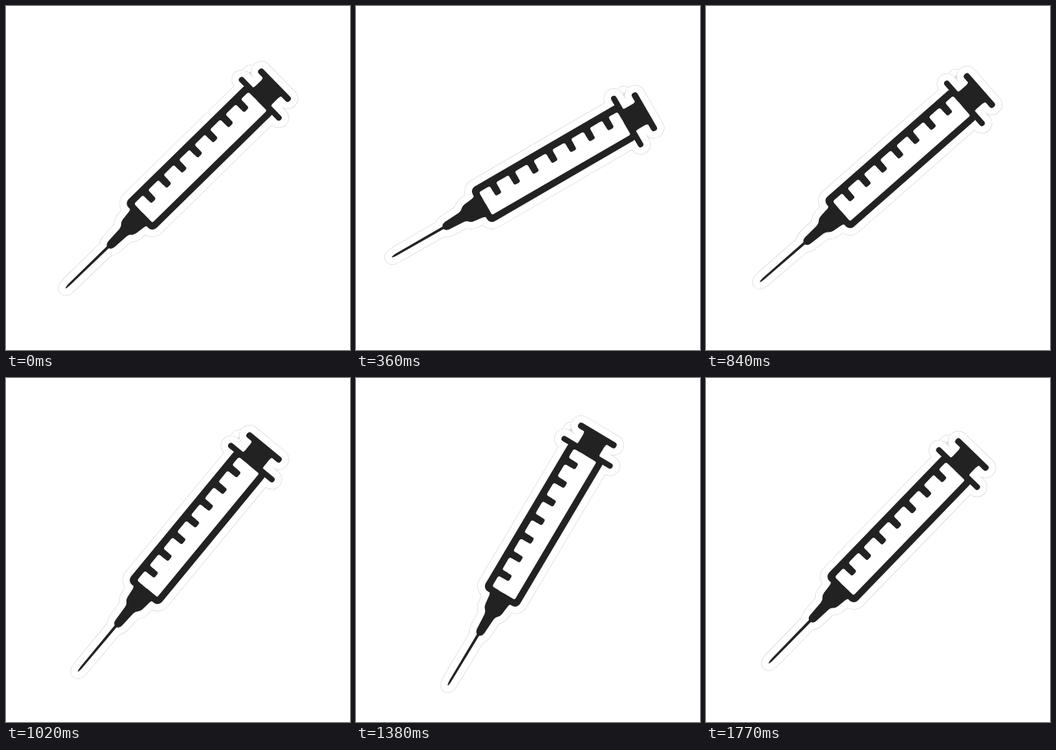
An HTML page that plays this animation: 448x448 px, repeating every 1800 ms.

```html
<!DOCTYPE html>
<html lang="en">
<head>
<meta charset="utf-8">
<title>Swinging syringe</title>
<style>
  html, body { margin: 0; width: 100%; height: 100%; overflow: hidden; background: #fff; }
  svg { display: block; width: 100vw; height: 100vh; }
  #syringe { fill: #222; }
  .border { stroke-linejoin: round; stroke-linecap: round; }
  #edge { stroke: #cfcfcf; stroke-width: 19; }
  #paper { stroke: #fff; fill: #fff; stroke-width: 18; }
  #window { fill: #fff; }
</style>
</head>
<body>
<svg viewBox="0 0 448 448">
  <defs>
    <!-- x runs along the barrel, from needle to plunger -->
    <g id="body">
      <rect x="-73" y="-25.3" width="224" height="52.2" rx="7.5"/>
      <rect x="145" y="-37" width="7.4" height="76.5" rx="3.7"/>
      <path d="M149-18.5Q152-15 155-15H166Q170-15 173-18.5V20.5Q170 17 166 17H155Q152 17 149 20.5Z"/>
      <rect x="170.3" y="-27" width="8.2" height="57" rx="3.7"/>
      <path d="M-70-17Q-74-13-79-13L-89-11.8Q-93-11.2-95-8.8Q-97-6.4-101-6L-122-4.8Q-128.3-4.2-128.5 .8Q-128.3 5.8-122 6.4L-101 7.6Q-97 8-95 10.4Q-93 12.8-89 13.4L-79 14.6Q-74 14.6-70 18.6Z"/>
      <path d="M-126-1.3L-198-1.3Q-205 -.8-205.2 .2Q-205 1.2-198 1.5L-126 2.3Z"/>
    </g>
    <g id="outline">
      <use href="#body"/>
      <circle cx="163" cy="-32" r="1"/>
    </g>
  </defs>
  <g id="syringe">
    <use id="edge" class="border" href="#outline"/>
    <use id="paper" class="border" href="#outline"/>
    <use href="#body"/>
    <g id="window"><rect x="-64.5" y="-7" width="208.5" height="25.2" rx="2"/></g>
    <g id="ticks"></g>
  </g>
</svg>
<script>
  const LOOP = 1800, STEP = 30;
  const REST = 44.4, SWING = 15;
  const TICKS = 7, FIRST = -43.6, GAP = 28.2, THICK = 9;
  const LEFT = -64.5, RIGHT = 144;
  const byId = id => document.getElementById(id);

  function addRect(parent, x, y, width, height, rx) {
    const rect = document.createElementNS("http://www.w3.org/2000/svg", "rect");
    for (const [key, value] of Object.entries({ x, y, width, height, rx })) {
      rect.setAttribute(key, value);
    }
    parent.append(rect);
  }

  // White cells between the marks, then the marks themselves.
  let left = LEFT;
  for (let i = 0; i <= TICKS; i++) {
    const tick = FIRST + i * GAP - THICK / 2;
    const right = i < TICKS ? tick : RIGHT;
    addRect(byId("window"), left, -16, right - left, 18, 3);
    if (i < TICKS) addRect(byId("ticks"), tick, -18, THICK, 17.3, 2.6);
    left = tick + THICK;
  }

  function draw(now) {
    const time = Math.floor((now % LOOP) / STEP) * STEP;
    const angle = REST - SWING * Math.sin(2 * Math.PI * time / LOOP);
    byId("syringe").setAttribute("transform", `translate(224 224) rotate(${-angle})`);
  }

  const start = performance.now();
  function tick() {
    draw(performance.now() - start);
    requestAnimationFrame(tick);
  }
  tick();
</script>
</body>
</html>
```
